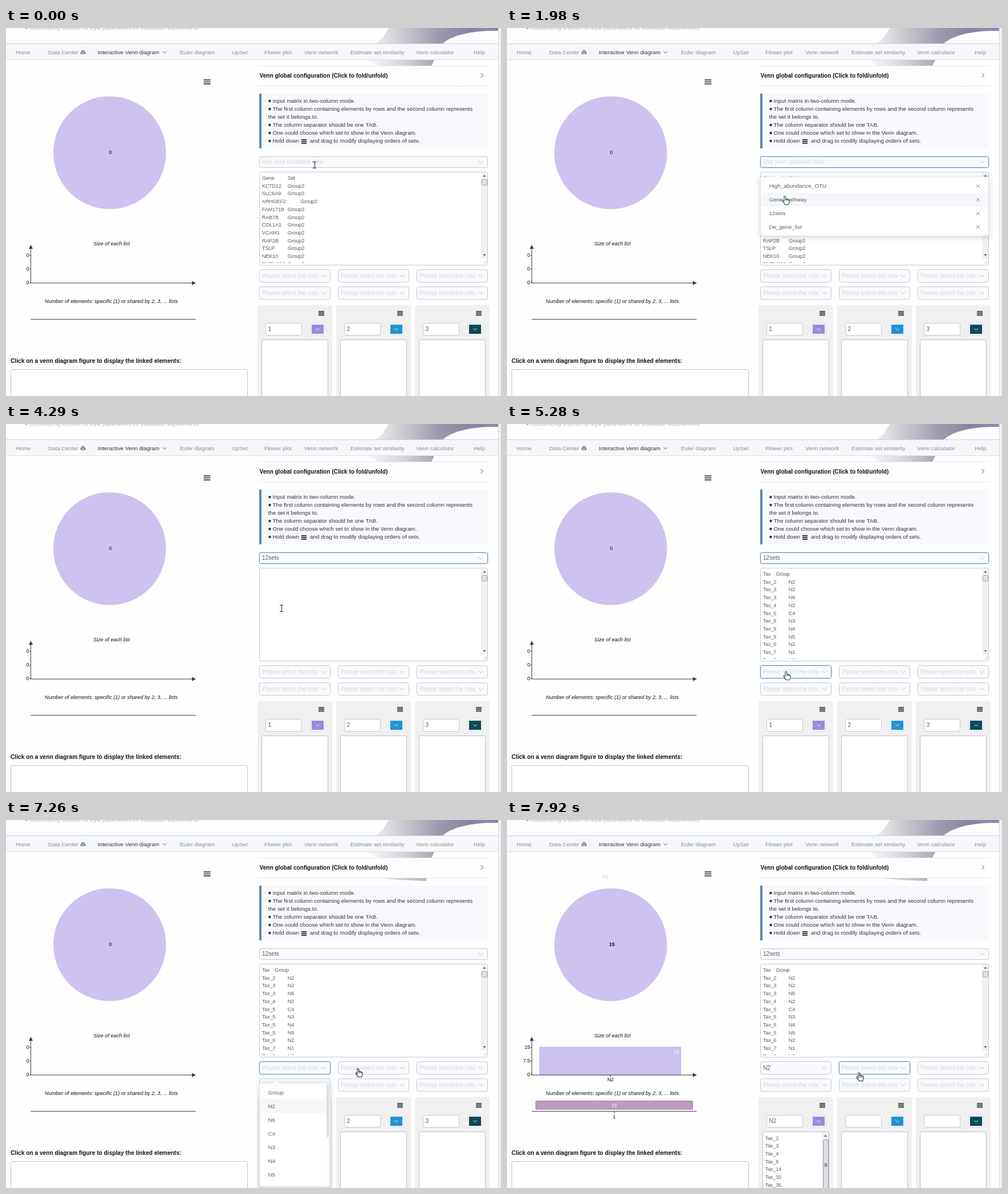
Animation of 868 by 645 pixels, one loop 8000 ms. Source, as an HTML page with a canvas:

```html
<!DOCTYPE html>
<html lang="en">
<head>
<meta charset="utf-8">
<title>Venn diagram configuration</title>
<style>
  html, body { margin: 0; width: 100%; height: 100%; overflow: hidden; background: #fff; }
  canvas { display: block; width: 868px; height: 645px; }
</style>
</head>
<body>
<canvas id="stage" width="868" height="645"></canvas>
<script>
const ctx = document.getElementById('stage').getContext('2d');
const LOOP = 8000, STEP = 330;
const LILAC = '#cdc2f0', BORDER = '#c3c9d4', FOCUS = '#5f93bd', INK = '#5c5e64', PALE = '#d3d7e0';

const GENES = ['Gene\tSet', ...['KCTD12', 'SLC6A9', 'ARHGEF2', 'FAM171B', 'RAB7B', 'COL1A1', 'VCAM1',
  'RAP2B', 'TSLP', 'NEK10', 'TMEM119'].map(g => g + '\tGroup2')];
const TAXA = ['Tax\tGroup', ...['2 N2', '3 N2', '3 N6', '4 N2', '5 C4', '5 N3', '5 N4', '5 N5',
  '6 N2', '7 N1', '8 N6'].map(r => 'Tax_' + r.replace(' ', '\t'))];
const MEMBERS = [2, 3, 4, 6, 14, 32, 35].map(n => 'Tax_' + n);
const UPLOADS = ['High_abundance_OTU', 'Gene_pathway', '12sets', 'De_gene_list'];
const COLUMNS = ['Group', 'N2', 'N6', 'C4', 'N3', 'N4', 'N5', 'N1'];

// Pointer stops: first step, x, y
const POINTER = [[0, 541, 240], [1, 541, 242], [4, 525, 263], [5, 497, 295], [6, 489, 302], [7, 486, 311],
  [8, 485, 317], [9, 483, 321], [10, 483, 323], [15, 491, 441], [18, 487, 480], [19, 484, 506],
  [21, 617, 448], [22, 619, 443], [24, 619, 450]];

// y is the middle of the capitals; baselines sit on whole pixels
function text(s, x, y, { size = 9.85, color = INK, style = '', align = 'left' } = {}) {
  ctx.font = `${style} ${size}px "Liberation Sans", Arial, sans-serif`;
  ctx.fillStyle = color;
  ctx.textAlign = align;
  ctx.fillText(s, x, Math.round(y + size * 0.36 - 0.3));
}

function rect(x, y, w, h, fill) {
  ctx.fillStyle = fill;
  ctx.fillRect(x, y, w, h);
}

function box(x, y, w, h, fill, stroke, radius = 3) {
  ctx.beginPath();
  ctx.roundRect(x, y, w, h, radius);
  if (fill) { ctx.fillStyle = fill; ctx.fill(); }
  if (stroke) { ctx.strokeStyle = stroke; ctx.lineWidth = 1; ctx.stroke(); }
}

function line(points, color, width = 1) {
  ctx.beginPath();
  points.forEach(([x, y]) => ctx.lineTo(x, y));
  ctx.strokeStyle = color;
  ctx.lineWidth = width;
  ctx.stroke();
}

function shape(points, fill) {
  ctx.beginPath();
  points.forEach(([x, y]) => ctx.lineTo(x, y));
  ctx.fillStyle = fill;
  ctx.fill();
}

function disc(x, y, r, fill) {
  ctx.beginPath();
  ctx.arc(x, y, r, 0, 7);
  ctx.fillStyle = fill;
  ctx.fill();
}

function gradient(x0, x1, ...colors) {
  const g = ctx.createLinearGradient(x0, 0, x1, 0);
  colors.forEach((c, i) => g.addColorStop(i / (colors.length - 1), c));
  return g;
}

function clipped(x, y, w, h, draw) {
  ctx.save();
  ctx.beginPath();
  ctx.rect(x, y, w, h);
  ctx.clip();
  draw();
  ctx.restore();
}

function shadowed(draw) {
  ctx.save();
  ctx.shadowColor = 'rgba(0,0,0,.16)';
  ctx.shadowBlur = 9;
  ctx.shadowOffsetY = 2;
  draw();
  ctx.restore();
}

function chevron(x, y, up, color = '#b4bac6', w = 4) {
  const d = up ? -w / 2 : w / 2;
  line([[x - w, y - d], [x, y + d], [x + w, y - d]], color);
}

function burger(x, y, w, rows, gap, thick, color) {
  for (let i = 0; i < rows; i++) rect(x, y + i * gap, w, thick, color);
}

function triangle(x, y, dir) {
  shape([[x - 2.5, y + 1.5 * dir], [x + 2.5, y + 1.5 * dir], [x, y - 1.5 * dir]], '#505050');
}

// Rows of plain text with tab stops
function rows(list, x, y) {
  ctx.letterSpacing = '-0.25px';
  list.forEach((row, i) => {
    let dx = 0;
    for (const cell of row.split('\t')) {
      text(cell, x + dx, y + i * 13.7, { size: 9.3 });
      dx = Math.ceil((dx + ctx.measureText(cell).width + 3.3) / 22.5) * 22.5;
    }
  });
  ctx.letterSpacing = '0px';
}

function select(x, y, w, h, { value, hint, active, open }) {
  if (active) box(x - 1, y - 1, w + 2, h + 2, null, 'rgba(95,147,189,.25)', 4);
  box(x, y, w, h, '#f9fafc', active ? FOCUS : BORDER);
  text(value || hint, x + 4.5, y + h / 2, { size: 10.1, color: value ? INK : PALE });
  chevron(x + w - 12, y + h / 2, open);
}

function popper(x, y, w, h) {
  shadowed(() => box(x, y, w, h, '#fff', '#e4e7ed', 3));
  shape([[x + 25, y + 1], [x + 30, y - 4], [x + 35, y + 1]], '#fff');
}

function background(step) {
  rect(0, 0, 868, 645, '#fefefe');
  disc(36, 0, 2.2, '#bbb');
  text('Customizing a bunch of style parameters for individual requirements', 41, 0, { color: '#b5b5b8' });

  shape([[671, 0], [864, 0], [864, 27], [649, 27], [661, 16]],
    gradient(650, 864, '#ebeaed', '#c6c4cc', '#9f9bae', '#8883a2', '#8d87ae'));
  ctx.beginPath();
  ctx.moveTo(766, 27);
  ctx.bezierCurveTo(783, 12, 818, 4, 864, 5);
  ctx.lineTo(864, 27);
  ctx.fillStyle = '#fdfdfe';
  ctx.fill();
  shape([[634, 56], [751, 56], [746, 66], [652, 66]], gradient(634, 751, '#fafafa', '#d8d6dc', '#aaa7b5'));
  if (step >= 18) {
    shape([[645, 101], [737, 101], [737, 107], [690, 105]], gradient(645, 737, '#e9e8ec', '#b5b3be'));
  } else {
    line([[792, 101.5], [797, 102], [803, 101.5]], '#cfcdd8');
  }
  rect(863, 0, 5, 645, '#eeeef3');
  rect(863, 0, 1, 645, '#d9dbe2');
}

function navigation() {
  rect(0, 27, 863, 29, '#f5f7fa');
  rect(0, 27, 863, 1, '#c6d0dc');
  rect(0, 55, 863, 1, '#d9dfe7');
  [['Home', 17], ['Data Center', 74], ['Interactive Venn diagram', 161], ['Euler diagram', 305], ['UpSet', 396.5],
    ['Flower plot', 453], ['Venn network', 523], ['Estimate set similarity', 604], ['Venn calculator', 719],
    ['Help', 820]].forEach(([s, x], i) => text(s, x, 42.5, { size: 9.75, color: i === 2 ? '#303133' : '#8a8e96' }));
  disc(132.5, 43.5, 2.3, '#8a8e96');
  disc(135, 41.5, 3, '#8a8e96');
  disc(137.5, 43.5, 2.3, '#8a8e96');
  rect(132, 43, 6, 2.8, '#8a8e96');
  line([[135, 45], [135, 41]], '#fff');
  chevron(278, 42.5, false, '#606266', 3.5);
}

function charts(filled) {
  const axis = '#43373c', small = { size: 8.8, color: '#111', align: 'center' };
  const right = { ...small, align: 'right' };
  const title = { size: 9.15, color: '#111', style: 'italic', align: 'center' };
  const white = { ...small, color: '#fff' };

  burger(346.5, 90, 12, 3, 3.5, 2, '#555');
  disc(181.8, 218.5, 98.8, LILAC);
  if (filled) text('N2', 172.5, 99, { size: 9.2, color: LILAC, align: 'center' });
  text(filled ? '15' : '0', filled ? 184 : 183, 218, { ...small, style: filled ? 'bold' : '' });

  text('Size of each list', 185, 378.5, title);
  text('Number of elements: specific (1) or shared by 2, 3, ... lists', 184.7, 479.5, title);
  (filled ? ['15', '7.5', '0'] : ['0', '0', '0']).forEach((s, i) => {
    text(s, 40.5, 398 + i * 24, right);
    line([[41, 398.5 + i * 24], [44, 398.5 + i * 24]], axis);
  });
  if (filled) {
    box(57.5, 398, 247, 48.5, LILAC, '#b9abe4', 0);
    text('15', 297, 406, white);
    line([[181.5, 447], [181.5, 450]], axis);
    text('N2', 181.5, 455, small);
    box(50.5, 492.5, 275, 14.5, '#bd9bbd', '#9b7b9c', 0);
    text('15', 188, 500, white);
    line([[188, 510], [188, 514]], axis);
    text('1', 188, 520, small);
  }
  line([[43.5, 384], [43.5, 447], [328, 447]], axis);
  shape([[40, 387], [43.5, 380], [47, 387]], axis);
  shape([[326, 443.5], [333, 447], [326, 450.5]], axis);
  line([[43.5, 510.5], [332.5, 510.5]], axis);

  text('Click on a venn diagram figure to display the linked elements:', 8, 584,
    { size: 10.2, color: '#111', style: 'bold' });
  box(8.5, 598.5, 415, 60, '#fff', '#bfc4d6', 2);
}

function instructions() {
  rect(444, 66, 401, 1, '#e6e9ef');
  rect(444, 101, 401, 1, '#e6e9ef');
  text('Venn global configuration (Click to fold/unfold)', 444.5, 84, { size: 10.1, color: '#111', style: 'bold' });
  line([[832.5, 79], [836.5, 83], [832.5, 87]], '#555');

  box(444, 115, 401, 96, '#f7f9fc');
  rect(444, 115, 4, 96, '#5d87ae');
  const dark = { color: '#303133' };
  [['Input matrix in two-column mode.', 128],
    ['The first column containing elements by rows and the second column represents', 142],
    ['The column separator should be one TAB.', 170],
    ['One could choose which set to show in the Venn diagram.', 184],
    ['Hold down', 198]].forEach(([s, y]) => {
    disc(462.5, y, 2.2, '#303133');
    text(s, 467.5, y, dark);
  });
  text('the set it belongs to.', 459.5, 156, dark);
  box(515.5, 191.5, 14, 13, '#f1f2f4', null, 2);
  burger(518, 195, 9, 3, 3, 1.6, '#111');
  text('and drag to modify displaying orders of sets.', 533, 198, dark);
}

function matrix(list) {
  box(444.5, 252.5, 400, 163, '#fff', BORDER);
  clipped(446, 254, 387, 158, () => rows(list, 448.7, 263));
  rect(833, 254, 11, 150, '#f1f1f1');
  triangle(839, 259, 1);
  triangle(839, 398, -1);
  box(834.5, 265.5, 9, 10, '#e2e2e4', '#a5a5a8', 1);
  line([[837, 413], [843, 407]], '#c4c4c4');
  line([[840, 413], [843, 410]], '#c4c4c4');
}

function panels(filled) {
  const names = filled ? ['N2', '', ''] : ['1', '2', '3'];
  ['#9d89df', '#2193d3', '#0c4a57'].forEach((color, i) => {
    const x = 441 + i * 138;
    box(x, 486, 131, 170, '#f0f0f0', null, 4);
    burger(x + 107, 496, 10, 4, 2.3, 1.3, '#222');
    box(x + 14.5, 517.5, 63, 21, '#fff', BORDER);
    text(names[i], x + 18.5, 528, { size: 10.1 });
    box(x + 92.5, 517.5, 26, 21, '#f1f1f3', '#e6e7ec');
    rect(x + 95, 520, 21, 16, color);
    chevron(x + 105.5, 528, false, '#fff', 3);
    box(x + 7.5, 546.5, 116, 110, '#fff', '#b9c0d4', 2);
  });
  if (!filled) return;
  rows(MEMBERS, 452.5, 557.5);
  rect(553, 548, 11, 97, '#f1f1f1');
  triangle(558.5, 553.5, 1);
  box(554.5, 560.5, 9, 90, '#dcdce2', '#9c9ca6', 1);
  burger(556.5, 602, 5, 3, 2.2, 1, '#555');
}

function selectors(step) {
  const filled = step >= 23, open = step >= 17 && step < 23;
  for (let r = 0; r < 2; r++) for (let c = 0; c < 3; c++) {
    const first = !r && !c, second = !r && c === 1;
    select(444.5 + c * 138, 423.5 + r * 30, 124, 22, {
      value: first && filled && 'N2', hint: 'Please select the colu',
      active: (first && step >= 16 && step < 24) || (second && step >= 24), open: first && open
    });
  }
}

function uploadMenu(hover) {
  popper(444.5, 261, 400, 103.5);
  UPLOADS.forEach((s, i) => {
    const y = 277 + i * 24;
    if (i === hover) rect(445, y - 12, 399, 24, '#f5f7fa');
    text(s, 459.5, y);
    line([[823.3, y - 2.7], [828.7, y + 2.7]], '#6f94b4');
    line([[828.7, y - 2.7], [823.3, y + 2.7]], '#6f94b4');
  });
}

function columnMenu(hover, scrollbar) {
  popper(444.5, 461, 123.5, 181.5);
  clipped(445, 461, 123, 182, () => COLUMNS.forEach((s, i) => {
    const y = 477.5 + i * 24;
    if (i === hover) rect(445, y - 12, 122, 24, '#f5f7fa');
    text(s, 459.5, y);
  }));
  if (scrollbar) box(562, 463, 4.5, 93, '#dddee2', null, 2);
}

const HAND = new Path2D('M3.5 1.5Q5 0 6.2 1.5V6Q7.4 5 8.4 6.4Q9.6 5.6 10.6 7Q12.4 6.4 12.5 8.5V11' +
  'Q12.3 13 11 15.5H5Q4 13 1 10Q0 8 1.5 8Q2.5 8 3.5 9.5Z');

function pointer(step) {
  const [, x, y] = POINTER.filter(p => p[0] <= step).pop();
  if (step === 0 || step === 13 || step === 14) {
    line([[x - 3, y - 5.5], [x + 3, y - 5.5]], '#222');
    line([[x - 3, y + 5.5], [x + 3, y + 5.5]], '#222');
    line([[x + 0.5, y - 5], [x + 0.5, y + 5]], '#222');
    return;
  }
  ctx.save();
  ctx.translate(x - 6.5, y - 8);
  ctx.fillStyle = '#fff';
  ctx.fill(HAND);
  ctx.strokeStyle = step >= 4 && step < 20 ? '#24583a' : '#222';
  ctx.lineWidth = 1.1;
  ctx.stroke(HAND);
  line([[6.3, 6], [6.3, 9]], ctx.strokeStyle, 0.8);
  line([[8.5, 6.5], [8.5, 9]], ctx.strokeStyle, 0.8);
  line([[10.6, 7], [10.6, 9.5]], ctx.strokeStyle, 0.8);
  ctx.restore();
}

function draw(step) {
  const filled = step >= 23;
  background(step);
  navigation();
  charts(filled);
  instructions();
  select(444.5, 225.5, 400, 19, {
    value: step >= 12 && '12sets', hint: 'Use your uploaded data',
    active: step >= 2 && step < 17, open: step >= 2 && step < 12
  });
  matrix(step < 12 ? GENES : step < 14 ? [] : TAXA);
  panels(filled);
  selectors(step);
  if (step >= 3 && step < 12) uploadMenu(step < 6 ? -1 : step < 9 ? 1 : 2);
  if (step >= 17 && !filled) columnMenu(step < 18 ? -1 : step < 19 ? 0 : 1, step >= 18);
  pointer(step);
}

function tick() {
  draw(Math.floor(performance.now() % LOOP / STEP));
  requestAnimationFrame(tick);
}
tick();
</script>
</body>
</html>
```
